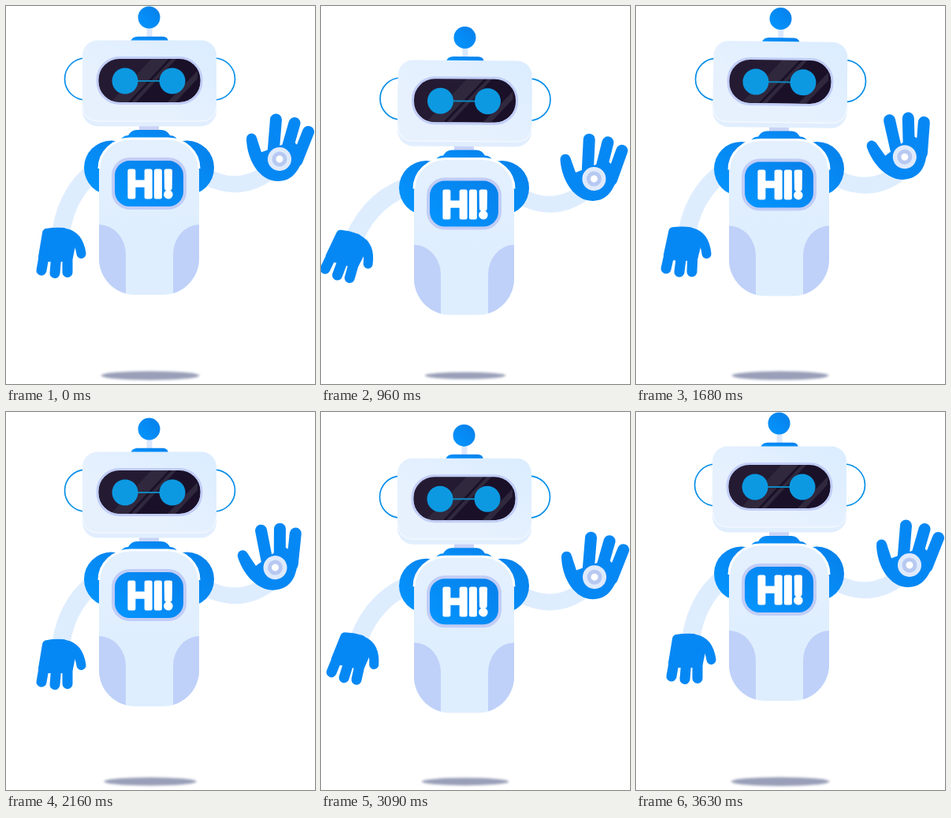
Write an HTML page that moves like this. It is 392 by 479 pixels and loops after 3.66 s.

```html
<!DOCTYPE html>
<html lang="en">
<head>
<meta charset="utf-8">
<title>Waving robot</title>
<style>
  html, body { margin: 0; width: 100%; height: 100%; overflow: hidden; background: #fff; }
  svg { display: block; width: 392px; height: 479px; }
  .blue { fill: url(#blue); }
  .hand { fill: #0688f4; stroke: #0688f4; stroke-linecap: round; stroke-linejoin: round; }
  .finger { fill: none; }
  .arm { fill: none; stroke: #deedfe; }
  .rim { fill: none; stroke: #c1cdf6; }
  text { font: 500 45px Inter, "Open Sans", sans-serif; fill: #fff; stroke: #fff;
         stroke-width: 5; stroke-linejoin: round; text-anchor: middle; }
</style>
</head>
<body>
<svg viewBox="0 0 392 479">
  <defs>
    <linearGradient id="blue" x1="0" y1="1" x2="1" y2="0">
      <stop offset="0" stop-color="#0496ff"/><stop offset="1" stop-color="#077fe9"/>
    </linearGradient>
    <linearGradient id="shell" x1="0" y1="1" x2="1" y2="0">
      <stop offset=".35" stop-color="#e7f1fe"/><stop offset=".9" stop-color="#dcedff"/>
    </linearGradient>
    <linearGradient id="torso" x1="0" y1="0" x2="0" y2="1">
      <stop offset="0" stop-color="#e4f0fe"/><stop offset=".7" stop-color="#deeefe"/>
    </linearGradient>
    <filter id="soft" x="-20%" y="-80%" width="140%" height="260%">
      <feGaussianBlur stdDeviation="1.6"/>
    </filter>
    <path id="trunk" d="M118 208A40 40 0 0 1 158 168H205A40 40 0 0 1 245 208V320A46 46 0 0 1 199 366H164A46 46 0 0 1 118 320Z"/>
    <clipPath id="inTrunk"><use href="#trunk"/></clipPath>
    <clipPath id="inVisor"><rect x="117" y="66" width="130" height="56" rx="27"/></clipPath>
  </defs>

  <ellipse id="shadow" cx="183" cy="468.3" fill="#999fb8" filter="url(#soft)"/>

  <g id="robot">
    <path class="arm" stroke-width="21" d="M235 204Q290 246 338 207"/>
    <g id="wave">
      <g class="hand">
        <path stroke="none" d="M305 169C306 196 322 222 345 222C364 222 372 208 380 186L364 171L333 182L322 186L318 167Z"/>
        <path class="finger" stroke-width="15" d="M342.500 144L339 187M366 148.500L355 187M383.500 159.500L369 196"/>
        <path class="finger" stroke-width="13" d="M311.500 168L319 191"/>
      </g>
      <circle cx="347" cy="194" r="15" fill="#dfeafc"/>
      <circle cx="347" cy="194" r="7" fill="#fff" stroke="#b7c9f2" stroke-width="5"/>
    </g>

    <g id="swing">
      <path class="arm" stroke-width="23" d="M127 199Q78 228 69.500 288"/>
      <g class="hand">
        <path stroke-width="12" d="M52 288Q62 286 73 287L82 303L79 318L47 318Z"/>
        <path class="finger" stroke-width="13" d="M49 312L45 335M64 314L62 338.500M78 312L78 337.500"/>
        <path class="finger" stroke-width="12" d="M75 288Q92 291 95.500 314"/>
      </g>
    </g>

    <circle class="blue" cx="133.500" cy="205" r="34.500"/>
    <circle class="blue" cx="229.500" cy="205" r="34.500"/>
    <rect x="169" y="146" width="25" height="14" fill="#c9d3f6"/>
    <path class="blue" d="M144 173Q147 164 155 164Q159 157 166 157H197Q204 157 208 164Q216 164 219 173Z"/>
    <use href="#trunk" fill="url(#torso)"/>
    <path fill="none" stroke="#fff" stroke-width="3" d="M118 206A40 38 0 0 1 158 168H205A40 38 0 0 1 245 206"/>
    <g clip-path="url(#inTrunk)" fill="#bfd1f9">
      <path d="M118 277A34 38 0 0 1 152 315V366H118Z"/>
      <path d="M245 277A33 38 0 0 0 212 315V366H245Z"/>
    </g>
    <rect class="blue" x="136" y="194" width="91" height="62" rx="21"/>
    <rect class="rim" stroke-width="4" x="136" y="194" width="91" height="62" rx="21"/>
    <text x="183" y="242">HI!</text>

    <g id="head">
      <g fill="#fff" stroke="#078fe9" stroke-width="1.700">
        <circle cx="101" cy="92.500" r="26.500"/>
        <circle cx="264" cy="92.500" r="26.500"/>
      </g>
      <rect x="178.500" y="25" width="7" height="16" fill="#dce8fd"/>
      <circle class="blue" cx="181.500" cy="14.500" r="14"/>
      <path class="blue" d="M158 45Q160 38.700 167 38.700H199Q205 38.700 206 45Z"/>
      <rect x="97" y="60" width="170" height="92.500" rx="20" fill="#e1eefe"/>
      <rect x="97" y="43.500" width="170" height="103" rx="19" fill="url(#shell)"/>
      <path fill="none" stroke="#f8fbff" stroke-width="1" d="M97.500 127Q98 146 117 146H247Q266 146 266.500 127"/>
      <g clip-path="url(#inVisor)">
        <rect x="114" y="63" width="136" height="62" fill="#1a1129"/>
        <path fill="#241b33" d="M114 63H188L130 125H114Z"/>
        <path fill="#30283d" d="M187 64H209L153 124H131ZM213 64H219L163 124H157ZM243 82V92L213 124H203Z"/>
      </g>
      <rect class="rim" stroke-width="3" x="116" y="65.500" width="132" height="58" rx="28"/>
      <path stroke="#0e86bd" stroke-width="2" d="M151 95H211"/>
      <g fill="#0c99e1">
        <circle cx="151" cy="95" r="16.500"/>
        <circle cx="211" cy="95" r="16.500"/>
      </g>
    </g>
  </g>
</svg>

<script>
const LOOP = 3660, BOB = 1830;

// [time, value] steps
const lift = [[0, 0], [330, 7], [510, 14.2], [780, 23.7], [915, 26], [1080, 22],
  [1260, 15.2], [1410, 9.7], [1620, 3], [1680, 1.5], [1800, 0], [BOB, 0]];
const swing = [[0, 0], [490, 0], [540, .6], [780, 5], [870, 12.5], [990, 16.3], [1080, 15.7],
  [1260, 12.5], [1410, 9.3], [1620, 4.6], [1680, 2.6], [1800, 0], [BOB, 0]];
const tilt = [[0, 0], [470, -9], [940, 0], [1330, 6], [1780, 0], [LOOP, 0]];

const WAVE = { start: 905, count: 4, period: 524, angle: 17.5 };

// Smooth curve through the steps, flat at every peak
function curve(steps) {
  const slope = i => (steps[i + 1][1] - steps[i][1]) / (steps[i + 1][0] - steps[i][0]);
  const tangents = steps.map((_, i) => {
    if (!i || i === steps.length - 1) return 0;
    const a = slope(i - 1), b = slope(i);
    return a * b > 0 ? 2 * a * b / (a + b) : 0;
  });
  return t => {
    let i = 0;
    while (i < steps.length - 2 && t >= steps[i + 1][0]) i++;
    const [t0, v0] = steps[i], [t1, v1] = steps[i + 1];
    const d = t1 - t0, u = (t - t0) / d, w = 1 - u;
    return v0 * w * w * (1 + 2 * u) + v1 * u * u * (3 - 2 * u)
      + d * u * w * (tangents[i] * w - tangents[i + 1] * u);
  };
}

function waveAt(t) {
  const phase = (t - WAVE.start) / WAVE.period;
  if (phase < 0 || phase > WAVE.count) return 0;
  return -WAVE.angle * (1 - Math.cos(2 * Math.PI * phase)) / 2;
}

const liftAt = curve(lift), swingAt = curve(swing), tiltAt = curve(tilt);
const el = id => document.getElementById(id);
const [robot, head, arm, hand, shadow] = ["robot", "head", "swing", "wave", "shadow"].map(el);
const turn = (node, angle, x, y) =>
  node.setAttribute("transform", `rotate(${angle.toFixed(3)} ${x} ${y})`);

function draw(time) {
  const t = time % LOOP, beat = t % BOB;
  const y = liftAt(beat), rise = Math.pow(Math.max(0, y / 26), .85);
  robot.setAttribute("transform", `translate(0 ${y.toFixed(3)})`);
  turn(head, tiltAt(t), 182, 168);
  turn(arm, swingAt(beat), 123, 180);
  turn(hand, waveAt(t), 330, 212);
  shadow.setAttribute("rx", 62.5 - 11.5 * rise);
  shadow.setAttribute("ry", 5.6 - 1.2 * rise);
}

const start = performance.now();
function tick() {
  draw(performance.now() - start);
  requestAnimationFrame(tick);
}
tick();
</script>
</body>
</html>
```
